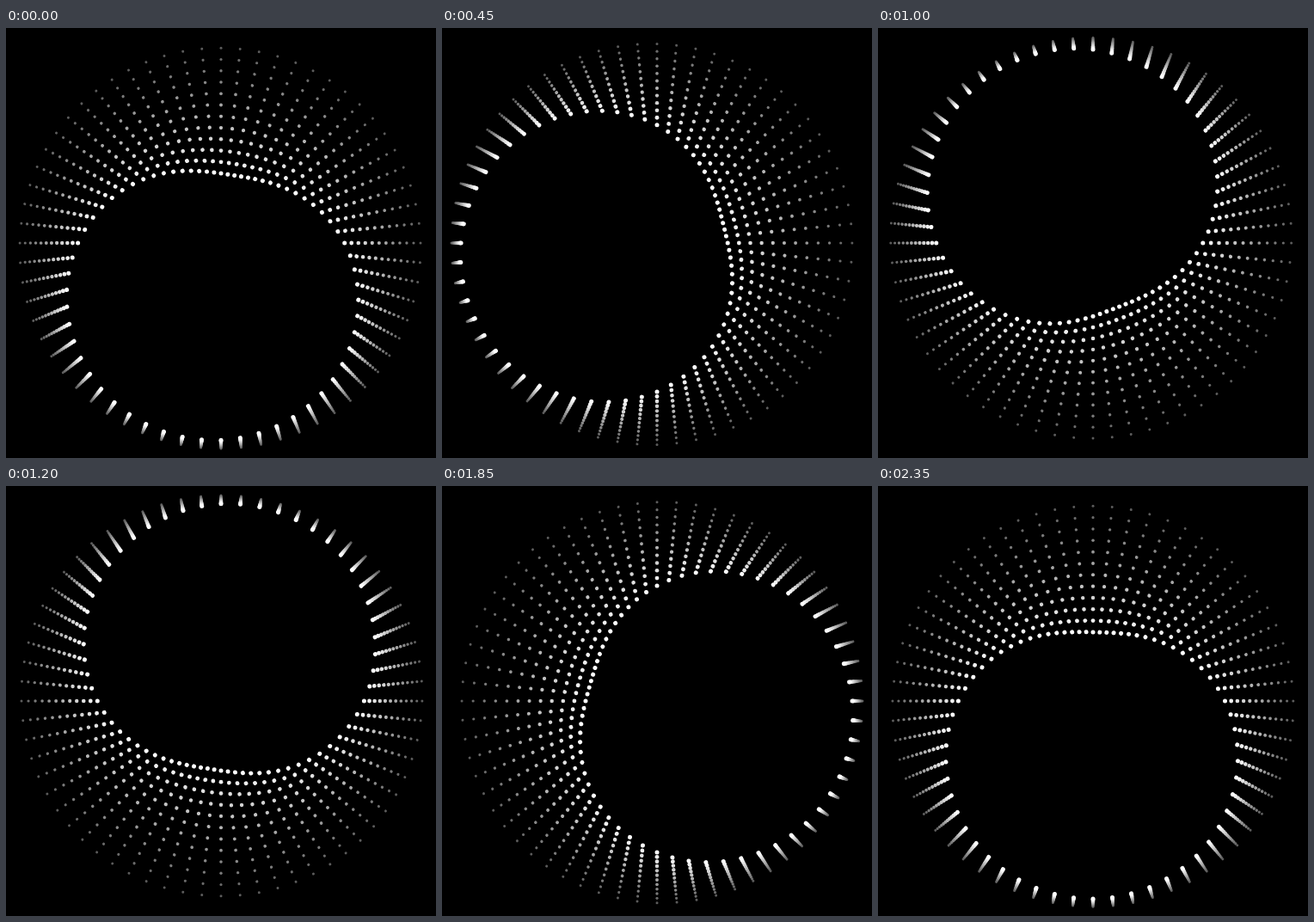
Animation of 500 by 500 pixels, one loop 2.4 s. Source, as an HTML page:

```html
<!DOCTYPE html>
<html lang="en">
<head>
<meta charset="utf-8">
<title>Rotating dot wave</title>
<style>
  html, body { margin: 0; width: 100%; height: 100%; overflow: hidden; background: #000; }
  svg { display: block; width: 100%; height: 100%; }
</style>
</head>
<body>
<svg id="stage" viewBox="0 0 500 500"></svg>
<script>
const NS = "http://www.w3.org/2000/svg";
const LOOP = 2400, STEP = 50;
const SPOKES = 64, DOTS = 12;
const RIM = 240, GAP = 7.08, SWING = 6.25;
const START = 8.7 * Math.PI / 180;
const TAU = 2 * Math.PI;

function add(parent, tag, attrs) {
  const el = document.createElementNS(NS, tag);
  for (const key in attrs) el.setAttribute(key, attrs[key]);
  return parent.appendChild(el);
}

// Each spoke points up and is turned into place; dots grow brighter inwards.
const stage = document.getElementById("stage");
const spokes = Array.from({ length: SPOKES }, (_, i) => {
  const g = add(stage, "g", { transform: `translate(250 250) rotate(${i * 360 / SPOKES})` });
  return Array.from({ length: DOTS }, (_, k) => {
    const u = k / (DOTS - 1);
    const v = Math.round(92 + 163 * u);
    return add(g, "circle", { r: 1.5 + u, fill: `rgb(${v},${v},${v})` });
  });
});

function draw(ms) {
  const t = Math.floor((ms % LOOP) / STEP) * STEP;
  const phase = START + TAU * t / LOOP;
  spokes.forEach((dots, i) => {
    const gap = GAP + SWING * Math.cos(TAU * i / SPOKES - phase);
    dots.forEach((dot, k) => dot.setAttribute("cy", ((k + 1) * gap - RIM).toFixed(2)));
  });
}

let origin = null;
function tick(now) {
  if (origin === null) origin = now;
  draw(now - origin);
  requestAnimationFrame(tick);
}
draw(0);
requestAnimationFrame(tick);
</script>
</body>
</html>
```
